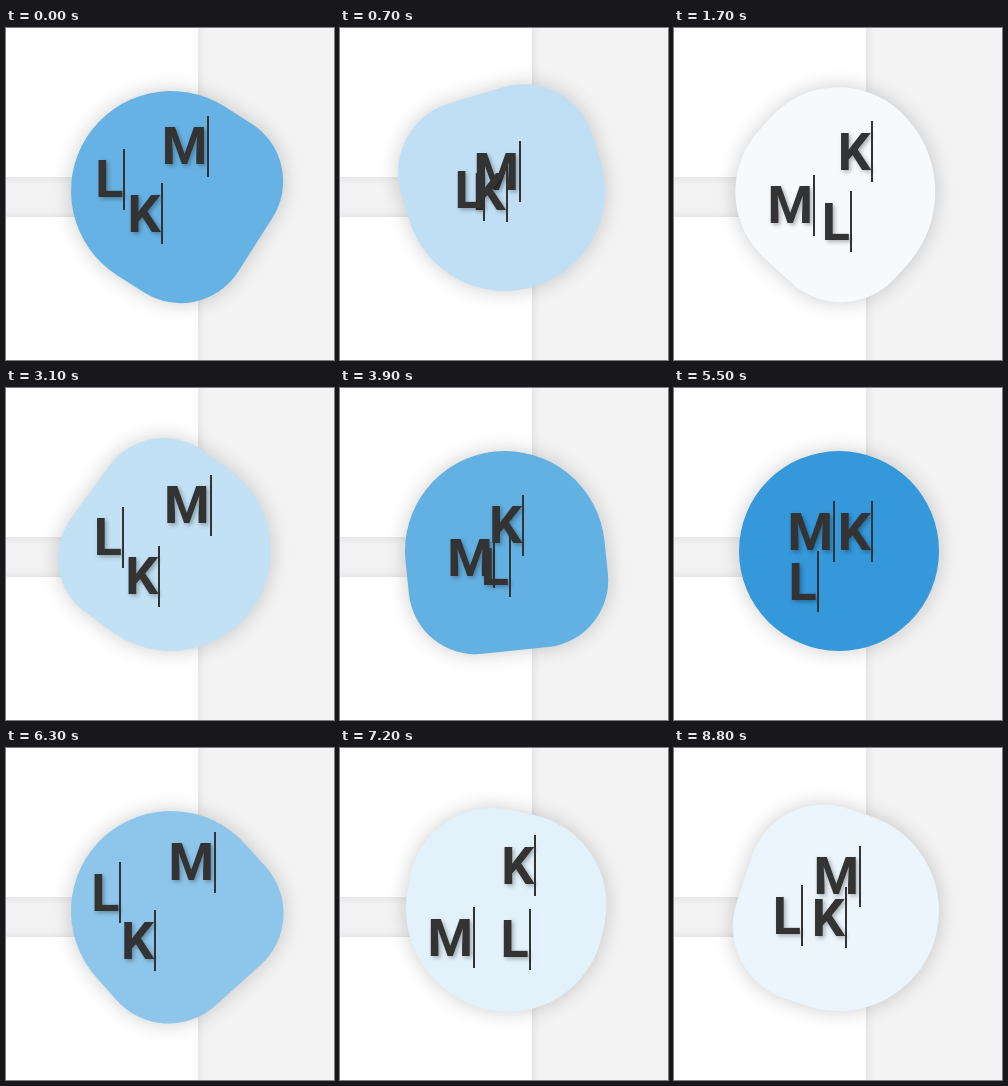
Write an HTML page with a canvas that moves like this. It is 328 by 332 pixels and loops after 8900 ms.

```html
<!DOCTYPE html>
<html lang="en">
<head>
<meta charset="utf-8">
<title>Morphing blob</title>
<style>
  html, body { margin: 0; width: 100%; height: 100%; overflow: hidden; background: #fff; }
  canvas { display: block; }
</style>
</head>
<body>
<canvas id="stage" width="328" height="332"></canvas>
<script>
const ctx = document.getElementById('stage').getContext('2d');
const LOOP = 8900;
const CYCLE = 3000;

// cubic-bezier(.25, .1, .25, 1)
function ease(x) {
  const curve = (u, a, b) => 3 * u * (1 - u) ** 2 * a + 3 * u * u * (1 - u) * b + u ** 3;
  let lo = 0, hi = 1;
  for (let i = 0; i < 24; i++) {
    const mid = (lo + hi) / 2;
    if (curve(mid, 0.25, 0.25) < x) lo = mid; else hi = mid;
  }
  return curve((lo + hi) / 2, 0.1, 1);
}

// Eased path from 0 through the given values, one per step, back to 0
function wander(t, step, ...stops) {
  const phase = t / CYCLE % 1;
  const i = Math.min(Math.floor(phase / step), stops.length);
  const from = stops[i - 1] ?? 0;
  const to = stops[i] ?? 0;
  const end = i === stops.length ? 1 : (i + 1) * step;
  return from + (to - from) * ease((phase - i * step) / (end - i * step));
}

function shadow(color, blur, offset = 0) {
  ctx.shadowColor = color;
  ctx.shadowBlur = blur;
  ctx.shadowOffsetX = ctx.shadowOffsetY = offset;
}

function drawBackground() {
  shadow('transparent', 0);
  ctx.fillStyle = '#f3f3f3';
  ctx.fillRect(0, 0, 328, 332);
  ctx.fillStyle = '#fff';
  shadow('rgba(0,0,0,0.1)', 10);
  ctx.fillRect(-30, -30, 222, 179);
  ctx.fillRect(-30, 189, 222, 180);
}

function blobColor(t) {
  const swing = t / CYCLE % 2;
  const part = ease(swing % 1);
  const white = swing < 1 ? part : 1 - part;
  const mix = v => Math.round(v + (255 - v) * white);
  return `rgb(${mix(52)}, ${mix(152)}, ${mix(219)})`;
}

function drawBlob(t) {
  const top = wander(t, 0.25, 10, -10, 10);
  const bottom = wander(t, 0.25, 10, -10, 0);
  const radii = [50 + top, 50 - top, 50 - bottom, 50 + bottom];
  // Radii along one side may not add up to more than the side
  const sides = radii.map((r, i) => r + radii[(i + 1) % 4]);
  const fit = Math.min(1, 100 / Math.max(...sides));
  ctx.save();
  ctx.translate(165, 163);
  ctx.rotate(t / CYCLE * Math.PI);
  ctx.beginPath();
  ctx.roundRect(-100, -100, 200, 200, radii.map(r => r * 2 * fit));
  ctx.fillStyle = blobColor(t);
  shadow('rgba(0,0,0,0.2)', 20);
  ctx.fill();
  ctx.restore();
}

function drawLetter(char, x, y) {
  const width = ctx.measureText(char).width;
  ctx.fillStyle = '#333';
  shadow('rgba(0,0,0,0.3)', 4, 2);
  ctx.fillText(char, x, y + 48.5);
  shadow('transparent', 0);
  ctx.fillRect(Math.round(x + width), Math.round(y), 2, 61);
}

function drawLetters(t) {
  const a = wander(t, 0.33, 50, -30);
  const b = wander(t, 0.33, -30, 50);
  const c = wander(t, 0.33, -50, 0);
  ctx.font = '700 52px Roboto, sans-serif';
  drawLetter('M', 113.5 + a, 113.2 + b);
  drawLetter('K', 163.8 + c, 113.2 + a);
  drawLetter('L', 114.5 + b, 163.2 + c);
}

function render(now) {
  const ms = now % LOOP;
  // The cycle starts partway in, with a slight lead that fades out
  const t = ms + 500 + Math.max(0, 40 * (1 - ms / 1500));
  drawBackground();
  drawBlob(t);
  drawLetters(t);
}

const began = performance.now();
function tick() {
  render(performance.now() - began);
  requestAnimationFrame(tick);
}
tick();
</script>
</body>
</html>
```
